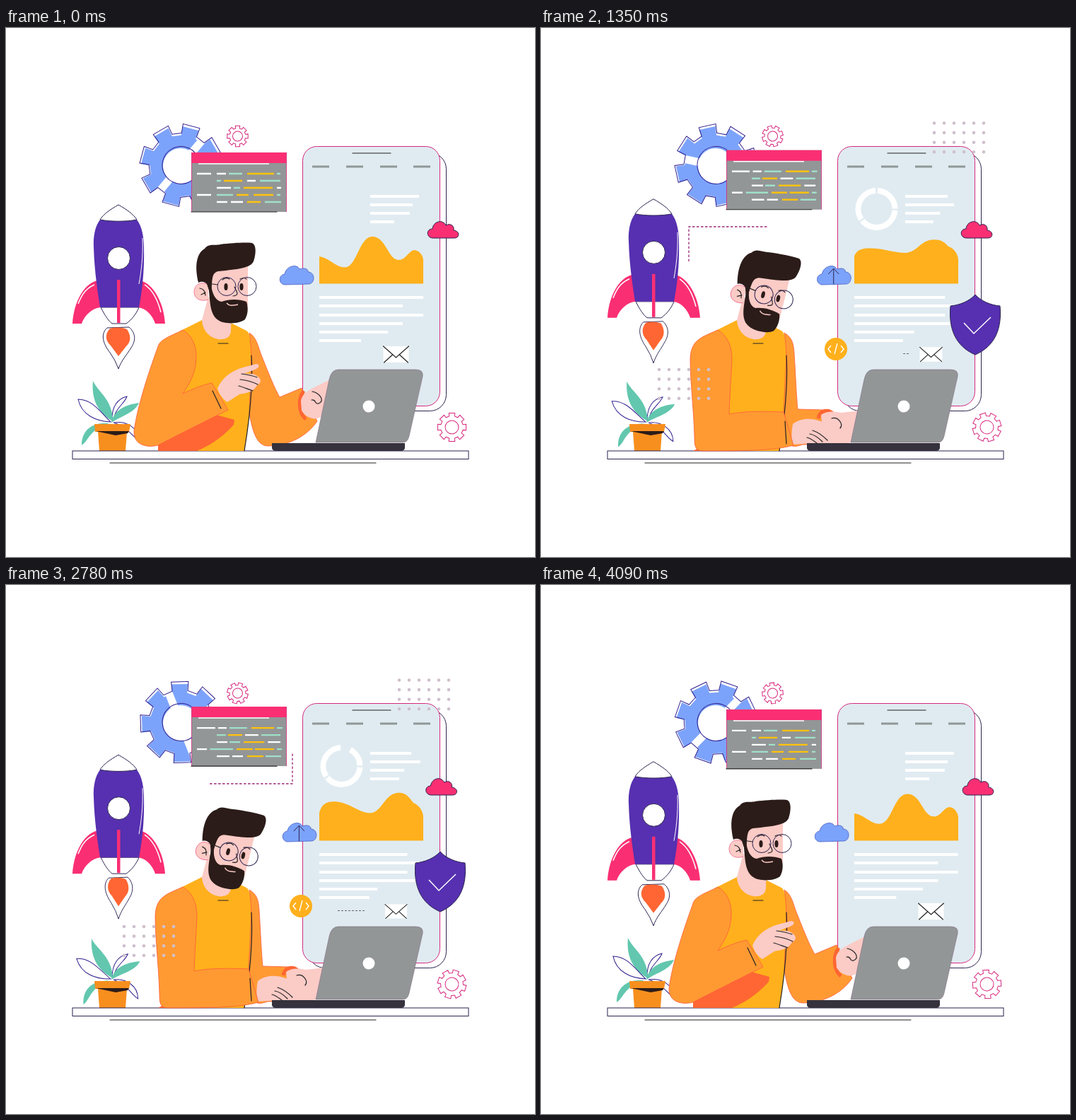
Recreate the animation shown at these times as an HTML page. Size 748 by 748 pixels, loop 4140 ms.

```html
<!DOCTYPE html>
<html lang="en">
<head>
<meta charset="utf-8">
<title>App launch</title>
<style>
html, body { margin: 0; width: 100%; height: 100%; overflow: hidden; background: #fff; }
svg { display: block; width: 100%; height: 100%; fill: none; }
.ink { stroke: #2b2350; }
.dark { stroke: #222; stroke-width: 1.2; stroke-linecap: round; }
.white { stroke: #fff; }
.pink { fill: #fa2f73; }
.purple { fill: #5630b0; }
.blue { fill: #7ca3fb; }
.grey { fill: #939697; }
.paper { fill: #fff; }
.skin { fill: #fbcbc6; }
.hair { fill: #2b1c19; }
.yellow { fill: #ffb01c; }
.orange { fill: #ff9a33; }
.red { fill: #ff6633; }
.teal { fill: #62c7ae; }
.sleeve { fill: #ff9a33; stroke: #ff5b3a; stroke-width: .8; }
.leaf { stroke: #32208f; }
.rose { stroke: #d6287f; }
</style>
</head>
<body>
<svg viewBox="0 0 748 748">
  <!-- gears -->
  <g id="wheel" class="blue"></g>
  <g id="rim" class="leaf"></g>
  <g id="cogA" class="rose"></g>
  <g id="cogB" class="rose"></g>

  <!-- code window -->
  <g id="win">
    <rect class="grey" x="262.500" y="176" width="134" height="84"/>
    <path class="pink" d="M262.500 176h134v15h-134z"/>
    <path class="white" stroke-width="1.5" d="M272 192H372"/>
    <path class="rose" stroke-width=".8" d="M396.500 176V260M262.500 176V260"/>
    <path class="dark" d="M262 260H383"/>
    <g stroke-width="2.400">
      <path id="codeW" stroke="#fff"/>
      <path id="codeG" stroke="#9fe0c8"/>
      <path id="codeY" stroke="#ffc20a"/>
    </g>
  </g>

  <path id="route" stroke="#9a2878" stroke-width="1.3" d="M209 330V281H405V235"/>

  <!-- phone -->
  <rect class="ink paper" x="428" y="176.500" width="194.500" height="365" rx="23"/>
  <rect class="rose" fill="#e0ebf1" x="419.500" y="167.500" width="194" height="367" rx="20"/>
  <path class="dark" d="M490 177H544"/>
  <path stroke="#8f9798" stroke-width="3" d="M433 196h24M481 196h24M529 196h24M576 196h24"/>
  <path id="ring" class="white" stroke-width="8"/>
  <path id="lines" class="white" stroke-width="4"/>
  <path id="wave" class="yellow"/>
  <path id="link" stroke="#666" d="M469 460.500H525"/>
  <g id="mail">
    <path class="paper" d="M533 450h36v23h-36z"/>
    <path class="dark" d="M533 450L551 466L569 450M534 473L546 462M568 473L556 462"/>
  </g>

  <g id="pinkCloud">
    <path class="ink pink" d="M603 297C594 296 594 284 603 284C604 273 618 270 622 279C630 275 634 281 633 286C642 287 642 297 634 297Z"/>
  </g>
  <g id="blueCloud">
    <path class="blue" stroke="#4a5fc0" stroke-width=".8" d="M394 363C385 362 385 349 394 348C396 336 412 333 415 341C424 338 428 342 427 345C438 345 437 362 428 362Z"/>
    <path id="arrow" class="ink" d="M410.500 362V341M403 348L410.500 340L418 348"/>
  </g>
  <g id="badge">
    <circle class="yellow" r="16"/>
    <path class="white" stroke-width="1.400" d="M-7 -5L-11 0L-7 5M7 -5L11 0L7 5M2 -8L-2 7"/>
  </g>
  <g id="shield">
    <path class="ink purple" d="M0 -43C8 -34 22 -28 35 -27C38 5 28 30 0 42C-28 30 -38 5 -35 -27C-22 -28 -8 -34 0 -43Z"/>
    <path id="check" class="white" stroke-width="1.500" pathLength="1" d="M-16 -3L-2 12L22 -11"/>
  </g>

  <!-- rocket -->
  <g id="rocket">
    <g id="flame">
      <path class="ink paper" d="M143 424C134 432 136 445 147 459Q155 470 159 482C163 470 171 462 177 452C185 440 182 430 174 423Z"/>
      <path class="red" d="M147 425C139 433 141 443 148 449L159 464L170 450C178 443 176 433 171 426C163 423 155 423 147 425Z"/>
    </g>
    <path class="pink" d="M129 357C110 362 96 387 94 418H107C111 406 122 396 134 395ZM190 357C208 362 223 387 225 418H211C207 406 198 396 186 395Z"/>
    <path class="white" stroke-width="1.500" d="M125 363C111 369 106 380 102 390M196 363C208 371 215 386 219 402"/>
    <path class="ink paper" d="M134 395C140 407 145 414 150 418H170C177 413 184 405 188 395Z"/>
    <path class="purple" d="M133 271C126 280 123 295 124 310C125 345 130 375 133 395H188C192 375 196 345 195 310C195 295 192 280 185 271C170 274 148 274 133 271Z"/>
    <path class="ink paper" d="M159 250C147 257 138 263 133 271C148 274 170 274 185 271C180 263 171 257 159 250Z"/>
    <path class="white" d="M193 297C194 325 191 345 188 362"/>
    <circle class="ink paper" cx="159.500" cy="325.500" r="16"/>
    <path class="pink" d="M157 356h4.500v61h-4.500z"/>
  </g>

  <!-- plant -->
  <g id="plant">
    <path class="leaf" data-k="2" d="M150 556C149 535 158 524 171 521C168 531 153 538 152 556"/>
    <path class="teal" data-k="3" d="M149 558C152 542 166 533 188 530C182 544 164 548 149 558Z"/>
    <path class="teal" data-k="-2" d="M151 556C134 546 120 530 123 499C130 515 151 525 151 556Z"/>
    <path class="leaf" data-k="-4" d="M148 557C128 556 107 548 102 525C121 525 131 540 148 557Z"/>
    <path class="teal" data-k="-4.500" d="M146 559C120 557 107 570 107 590C117 584 117 568 146 559Z"/>
    <path class="leaf" data-k="3" d="M152 558C170 555 187 565 188 583C178 578 172 563 152 558Z"/>
  </g>
  <path fill="#f78f1e" d="M125 560H176L174 571H171L169 598H132L130 571H126Z"/>
  <path class="hair" d="M127 570H174L172 573L155 576Z"/>

  <!-- desk -->
  <rect class="ink paper" x="94" y="598" width="560" height="11.500"/>
  <path class="dark" d="M147 615H523"/>

  <!-- person -->
  <path class="yellow" d="M277 413L320 418L340 428Q347 432 347 463C349 500 345 550 337 598H262L245 500V429Z"/>
  <path class="skin" d="M286 380L277 413C279 444 318 448 318 428L319 400Z"/>
  <path class="dark" d="M300 446H314"/>
  <path id="farArm" class="sleeve"/>
  <path id="farCuff" stroke="#ff6633" stroke-width="5"/>
  <path id="farHand" class="skin"/>
  <path id="farFold" class="dark"/>
  <path class="dark" d="M347 463C349 500 345 550 337 598"/>
  <path id="shade" class="red"/>
  <path id="hand" class="skin"/>
  <path id="fold" class="dark"/>
  <path id="arm" class="sleeve"/>
  <path id="cuff" class="dark"/>
  <g id="head">
    <path class="skin" d="M288 340L342 336V392L300 405L288 380Z"/>
    <path class="skin" stroke="#f0648c" stroke-width=".8" d="M286 363C275 357 266 363 266 374C267 385 278 387 286 384"/>
    <path class="dark" d="M274 368C281 369 281 374 282 378M276 377L282 374"/>
    <path class="hair" d="M272 360C266 335 270 318 281 312C286 304 296 308 303 306C320 304 338 303 348 304C355 307 353 322 350 330C346 339 330 341 300 344C293 346 292 350 291 362L290 380L284 362C280 358 276 358 272 360Z"/>
    <path class="hair" d="M286 362H290C291 375 296 386 305 387C315 383 330 383 340 387C343 396 342 405 338 412C330 419 308 419 300 413C287 404 289 385 286 362Z"/>
    <path stroke="#fbcbc6" stroke-width="1.500" d="M312 389C316 394 322 392 328 391"/>
    <g class="hair"><ellipse cx="311" cy="366" rx="2.600" ry="5"/><ellipse cx="333" cy="366" rx="2.600" ry="5"/></g>
    <path class="dark" d="M306 356Q311 352 316 355M331 355Q336 352 340 355M323 366C326 373 331 378 321 379M285 361L299 363"/>
    <g class="ink"><circle cx="312" cy="365.500" r="13"/><circle cx="341" cy="365.500" r="13"/></g>
  </g>

  <!-- laptop -->
  <path class="grey" stroke="#7f6b80" stroke-width=".6" d="M470 483H579Q591 483 589 493L570 577Q568 586 561 586H438L457 497Q460 483 470 483Z"/>
  <circle class="paper" cx="513" cy="535" r="8.500"/>
  <path fill="#35313d" d="M376 587H564V594Q563 598 559 598H381Q377 598 376 594Z"/>

  <g id="dots" stroke="#cfbfcd" stroke-width="4.600" stroke-linecap="round" stroke-dasharray="0 14"></g>
</svg>

<script>
const LOOP = 4140;
const el = id => document.getElementById(id);
const set = (id, name, value) => el(id).setAttribute(name, value);
const clamp = x => Math.min(1, Math.max(0, x));

// piecewise linear track: time, value, time, value, ...
function key(t, ...k) {
  let i = 0;
  while (i < k.length - 4 && t > k[i + 2]) i += 2;
  const [a, u, b, v] = k.slice(i, i + 4);
  return u + (v - u) * clamp((t - a) / (b - a));
}

// blend two path strings of equal structure
function mix(a, b, p) {
  const to = b.match(/[\d.]+/g);
  let i = 0;
  return a.replace(/[\d.]+/g, n => (+n + (to[i++] - n) * p).toFixed(2));
}

const polar = (r, deg) => {
  const a = (deg - 90) * Math.PI / 180;
  return `${(r * Math.cos(a)).toFixed(2)} ${(r * Math.sin(a)).toFixed(2)}`;
};

function gear(outer, root) {
  const points = [];
  for (let a = 0; a < 360; a += 45)
    points.push(polar(root, a - 14), polar(outer, a - 12), polar(outer, a + 12), polar(root, a + 14));
  return `M${points.join("L")}Z`;
}

el("wheel").innerHTML = `
  <path d="${gear(56, 43.5)}"/>
  <path class="white" stroke-width="11" transform="rotate(25)" d="M0 -46V46"/>
  <circle class="paper" r="25"/>`;
el("rim").innerHTML = `<path d="${gear(58.5, 45.5)}"/><circle r="26.500"/>`;
el("cogA").innerHTML = `<path d="${gear(15, 11.5)}"/><circle r="7"/>`;
el("cogB").innerHTML = `<path d="${gear(20.5, 16)}"/><circle r="9.500"/>`;

const rows = [0, 1, 2, 3].map(i => {
  const row = document.createElementNS("http://www.w3.org/2000/svg", "path");
  const y = 134.5 + 13.6 * i;
  row.setAttribute("d", `M556 ${y}h71M167 ${y + 348.5}h71`);
  return el("dots").appendChild(row);
});
const leaves = [...el("plant").children];

// shapes that breathe with the float
const floating = {
  codeW: ["M270 206H290M298 206H311M341 216H353M298 226H318M383 226H389M270 236H290M298 246H313M318 246H335",
          "M270 206H296M300 206H312M338 216H357M298 226H313M370 226H388M270 236H284M298 246H316M320 246H335"],
  codeG: ["M315 206H334M383 206H388M298 216H304M359 216H388M322 226H331M298 236H321M383 236H388M366 246H389",
          "M316 206H341M383 206H391M298 216H311M361 216H388M316 226H331M288 236H321M383 236H390M367 246H389"],
  codeY: ["M341 206H379M308 216H334M336 226H377M326 236H343M350 236H378M341 246H360",
          "M347 206H379M314 216H334M336 226H365M326 236H349M352 236H379M341 246H364"],
  lines: ["M515 238H584M515 250H575M515 262H571M515 274H549M443 381H590M443 393H561M443 406H590M443 418H561M443 430H540M443 442H502",
          "M515 238H573M515 250H586M515 262H563M515 274H556M443 381H567M443 393H585M443 406H567M443 418H585M443 430H525M443 442H514"],
  wave: ["M443 323C458 325 468 341 482 338C497 333 500 295 518 295C538 295 540 329 556 328C565 328 570 314 578 314C586 315 590 324 590 328V361.500H443Z",
         "M443 322C446 308 455 304 470 306C488 309 500 323 515 323C532 322 535 293 556 293C566 293 570 300 576 308C586 312 590 322 590 328V361.500H443Z"]
};

// gesturing pose and typing pose
const posed = {
  arm: ["M250 427C262 434 270 448 269 468C268 490 258 505 250 517C262 511 280 504 291 502L314 540C290 552 250 572 215 590C200 594 180 590 181 570C185 540 197 500 215 450C218 440 232 436 250 427Z",
        "M250 427C262 434 270 448 270 468C269 490 267 520 266 546C290 541 320 542 343 543L357 590C330 598 280 598 230 598C218 598 217 592 217 578C216 540 211 500 211 470C211 440 228 437 250 427Z"],
  cuff: ["M292 513L304 538", "M345 556L347 588"],
  shade: ["M215 588L290 545L323 554L322 561C305 580 285 592 270 598L215 598Z",
          "M230 590L270 590L300 590L300 593C290 597 280 598 270 598L215 598Z"],
  hand: ["M299 510C305 495 318 485 335 480L354 475C360 476 358 481 352 483L336 489C345 488 352 489 355 492C363 497 360 503 355 505C350 515 340 516 330 518L313 529C306 525 302 518 299 510Z",
         "M356 560C366 552 380 551 392 555L418 563C425 567 428 572 425 574L425 574C430 575 438 580 440 582C441 587 432 588 425 587C410 587 400 587 388 587L355 589C354 580 354 570 356 560Z"],
  fold: ["M333 489C340 490 350 492 355 494M331 497C340 498 350 501 356 504M329 506C336 508 343 511 349 513",
         "M384 569C390 571 398 576 405 583M380 574C387 575 393 580 398 585M376 579C381 580 386 584 390 587"],
  farArm: ["M344 431C355 438 356 450 362 465C372 490 380 510 387 522L418 509L440 556C425 578 400 590 372 591C355 592 349 572 344 545L347 463C346 445 345 436 344 431Z",
           "M344 431C356 438 357 447 358 460C360 490 361 520 363 539L400 540L418 576C410 586 390 589 370 589C350 596 345 590 343 545L347 463C346 445 345 436 344 431Z"],
  farCuff: ["M421 513C412 525 414 545 424 553", "M392 552C394 540 408 538 413 546"],
  farHand: ["M417 527C419 516 430 511 440 506L462 495L455 520L445 550C436 556 423 550 418 541Z",
            "M396 547C404 541 415 542 425 544L450 541L446 562L440 580C425 584 408 582 398 566Z"],
  farFold: ["M433 514C443 516 452 527 442 531C436 533 439 524 432 526", "M411 552C420 549 428 560 423 566C416 570 417 561 410 566"]
};

const morph = (shapes, p) => {
  for (const id in shapes) set(id, "d", mix(...shapes[id], p));
};
const place = (id, transform) => set(id, "transform", transform);
const dashes = (a, b, on, off) =>
  b - a < on ? "0 999" : `0 ${a} ${`${on} ${off} `.repeat((b - a + off) / (on + off))}0 999`;

function draw(now) {
  const t = now % LOOP, half = t % (LOOP / 2), quarter = t % (LOOP / 4);
  const s = key(half, 0, 0, 150, .26, 480, .62, 710, .98, 930, 1.02, 1150, .99, 1350, .82, 1700, .35, 2020, .02, 2070, 0);
  const p = key(t, 30, 0, 480, .65, 780, 1, 2950, 1, 3220, .52, 3650, 0);
  const spin = 360 * t / LOOP;

  morph(floating, s);
  morph(posed, p);
  place("wheel", `translate(247 195) rotate(${15 - spin})`);
  place("rim", `translate(247.5 194) rotate(${15 - spin})`);
  place("cogA", `translate(327.5 153) rotate(${spin})`);
  place("cogB", `translate(630.5 564.5) rotate(${spin})`);
  place("win", `translate(0 ${-4 * s})`);
  place("rocket", `translate(0 ${-10 * s})`);
  place("flame", `translate(159.5 0) scale(${1 - .13 * s} 1) translate(-159.5 0)`);
  place("pinkCloud", `translate(${-2.5 * s} 0)`);
  place("blueCloud", `translate(${4 * s} 0)`);
  place("mail", `translate(551.5 461.5) scale(${1 - .14 * s}) translate(-551 -461.5)`);
  for (const leaf of leaves) leaf.setAttribute("transform", `rotate(${leaf.dataset.k * s} 149 558)`);

  place("head", `rotate(${key(t, 50, 0, 480, -8, 950, 14, 3120, 14, 3220, 13, 3750, 0)} 267 384)`);
  place("badge", `translate(417 454) scale(${key(t, 150, 0, 450, 1, 2950, 1, 3250, 0)})`);
  place("shield", `translate(614 420) scale(${key(t, 200, 0, 480, .8, 600, 1, 3120, 1, 3220, .86, 3550, 0)})`);
  set("check", "stroke-dasharray", `${key(t, 600, 0, 900, 1)} 2`);
  set("arrow", "opacity", key(quarter, 120, 0, 280, 1, 750, 1, 950, 0));

  const from = key(t, 2715, 0, 3560, 360), to = key(t, 20, 0, 930, 360);
  set("ring", "d", [[3, 89], [94, 231], [236, 357]].map(([u, v]) => {
    u = Math.max(u, from);
    v = Math.min(v, to);
    return u < v ? `M${polar(26, u)}A26 26 0 0 1 ${polar(26, v)}` : "";
  }).join(""));
  place("ring", "translate(474.5 256)");

  set("route", "stroke-dasharray", dashes(key(t, 1760, 0, 4080, 291), key(t, 10, 0, 2430, 291), 3.5, 2.5));
  set("link", "stroke-dasharray", dashes(key(half, 920, 0, 1480, 56), key(half, 60, 0, 930, 56), 3, 2));
  rows.forEach((row, i) => {
    row.style.display = t > 380 + 130 * i && t < 3460 - 130 * i ? "" : "none";
  });
}

function tick() {
  draw(performance.now());
  requestAnimationFrame(tick);
}
tick();
</script>
</body>
</html>
```
